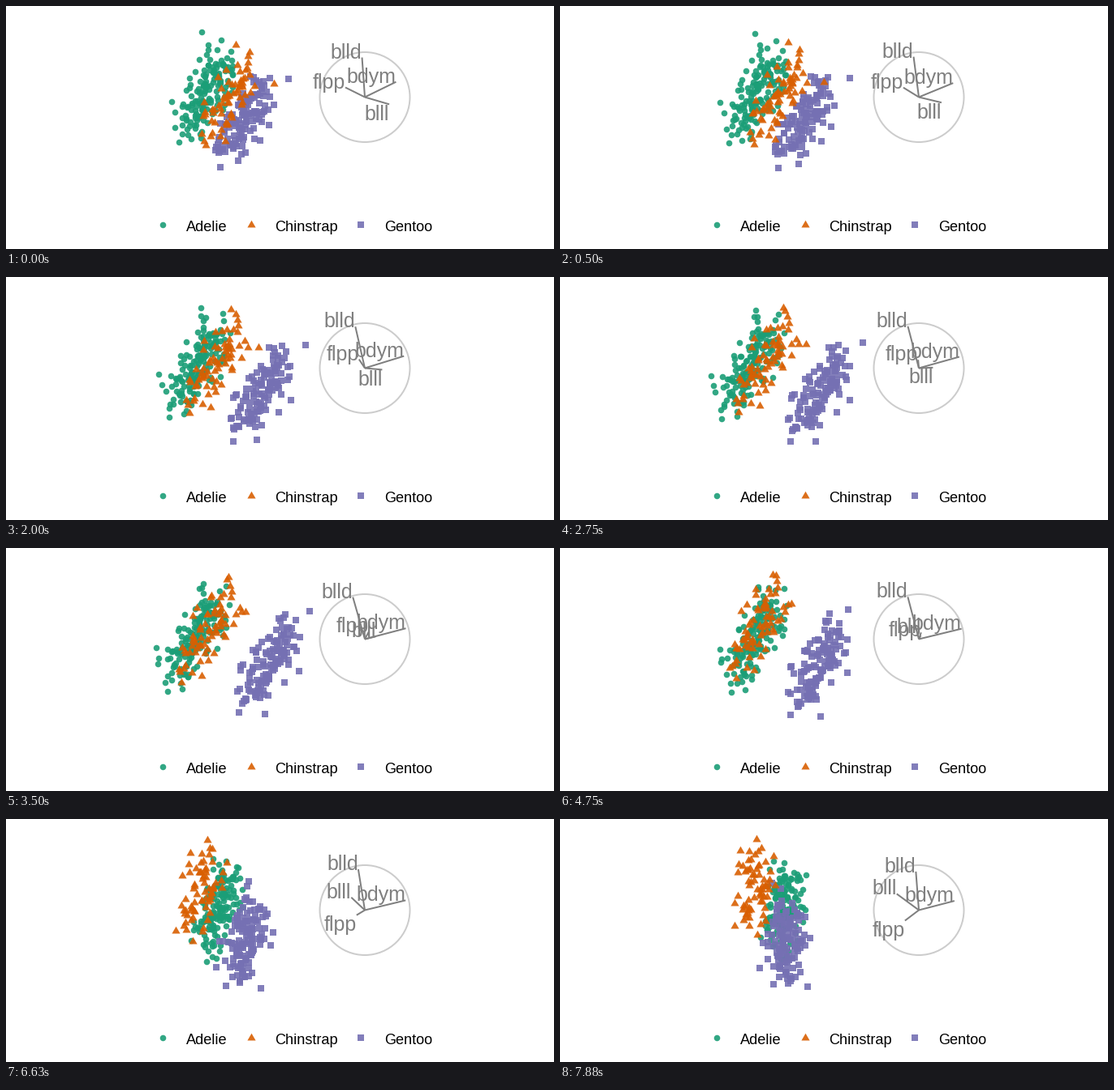
Animation of 675 by 300 pixels, one loop 8000 ms. Source, as a matplotlib script:

```python
import numpy as np
import matplotlib.pyplot as plt
from matplotlib.animation import FuncAnimation
from matplotlib.patches import Circle
from matplotlib.path import Path

W, H, DPI = 675, 300, 100
PT = 72 / DPI                      # points per pixel
GREY, RING = "#7f7f7f", "#cccccc"
FONT = "Liberation Sans"
CENTRE, RADIUS, REACH = np.array([442, 112.5]), 55.5, 54.5
CLOUD, SCALE = np.array([269, 120]), np.array([34.5, -41.5])

# Standardised bill length, bill depth, flipper length, body mass
NAMES = ["blll", "blld", "flpp", "bdym"]
SEX_SHIFT = np.array([0.35, 0.38, 0.25, 0.42])
SPREAD = np.array([0.42, 0.42, 0.40, 0.38])

TRIANGLE = Path([(0, 5.8), (5.1, -3), (-5.1, -3), (0, 5.8)], closed=True)
# name: (birds, mean, most unusual bird, marker style, legend x)
SPECIES = {
    "Adelie": (146, [-0.93, 0.61, -0.77, -0.62], [-1.7, 2.0, -0.2, 0.25],
               dict(color="#1b9e77", marker="o", ms=7.6 * PT), 193),
    "Gentoo": (119, [0.67, -1.10, 1.15, 1.11], [2.87, -0.08, 2.07, 2.3],
               dict(color="#7570b3", marker="s", ms=8.2 * PT), 437),
    "Chinstrap": (68, [0.90, 0.65, -0.36, -0.58], [0.55, -0.28, -0.63, -1.87],
                  dict(color="#d95f02", marker=TRIANGLE, ms=11.6 * PT), 301.5),
}

# The tour runs straight between three views; each row is an axis tip (x, y)
TURN, LAST = 5.5, 12
VIEWS = np.array([
    [(30, -9), (-4, 48), (-24, 12), (38, 18)],
    [(11.5, 4.5), (-15.5, 52.5), (8, 9.5), (51, 13)],
    [(-27, 20), (-3.5, 47.5), (-17, -13), (43.5, 11.5)],
])


def sample(rng, count, mean, unusual):
    shared = rng.normal(size=(count, 1))
    noise = 0.5 * shared + 0.87 * rng.normal(size=(count, 4))
    noise = np.clip((noise - noise.mean(0)) / noise.std(0), -2.2, 2.2)
    sex = np.where(np.arange(count) % 2, 1, -1)[:, None]
    return np.vstack([mean + sex * SEX_SHIFT + noise * SPREAD, unusual])


def step_at(frame):
    """Steps last six frames at first, then five."""
    return (frame + 2) // 6 if frame < 28 else 5 + (frame - 28) // 5


def basis(step):
    """Orthonormal projection from four variables to the plane."""
    if step < TURN:
        start, end, t = VIEWS[0], VIEWS[1], step / TURN
    else:
        start, end, t = VIEWS[1], VIEWS[2], (step - TURN) / (LAST - TURN)
    u, _, vt = np.linalg.svd(start + (end - start) * t, full_matrices=False)
    return u @ vt


fig = plt.figure(figsize=(W / DPI, H / DPI), dpi=DPI, facecolor="white")
ax = fig.add_axes([0, 0, 1, 1])
ax.set(xlim=(0, W), ylim=(H, 0))
ax.axis("off")


def markers(style, x=(), y=()):
    return ax.plot(x, y, ls="", mew=0, alpha=0.9, **style)[0]


rng = np.random.default_rng(7)
clouds = []
for name, (count, mean, unusual, style, key_x) in SPECIES.items():
    clouds.append((markers(style), sample(rng, count, mean, unusual)))
    markers(style, [key_x], [270])
    ax.text(key_x + 29.3, 278, name, color="black", family=FONT,
            size=18.2 * PT, va="baseline")

ax.add_patch(Circle(CENTRE, RADIUS, fill=False, ec=RING, lw=2 * PT))
spokes = [ax.plot([], [], color=GREY, lw=2 * PT, solid_capstyle="butt")[0]
          for _ in NAMES]
labels = [ax.text(0, 0, name, color=GREY, family=FONT, size=25 * PT,
                  ha="right", va="baseline") for name in NAMES]


def draw(frame):
    axes = basis(step_at(frame))
    for cloud, birds in clouds:
        cloud.set_data(*(CLOUD + birds @ axes * SCALE).T)
    for (dx, dy), spoke, label in zip(axes * REACH, spokes, labels):
        x, y = CENTRE[0] + dx, CENTRE[1] - dy
        spoke.set_data([CENTRE[0], x], [CENTRE[1], y])
        # Labels sit on the outer side of the tip
        label.set_position((x, y + 1 if dy > 1 else y + 19.5))
    return [cloud for cloud, _ in clouds] + spokes + labels


anim = FuncAnimation(fig, draw, frames=64, interval=125, repeat=True,
                     repeat_delay=0)
plt.show()
```
